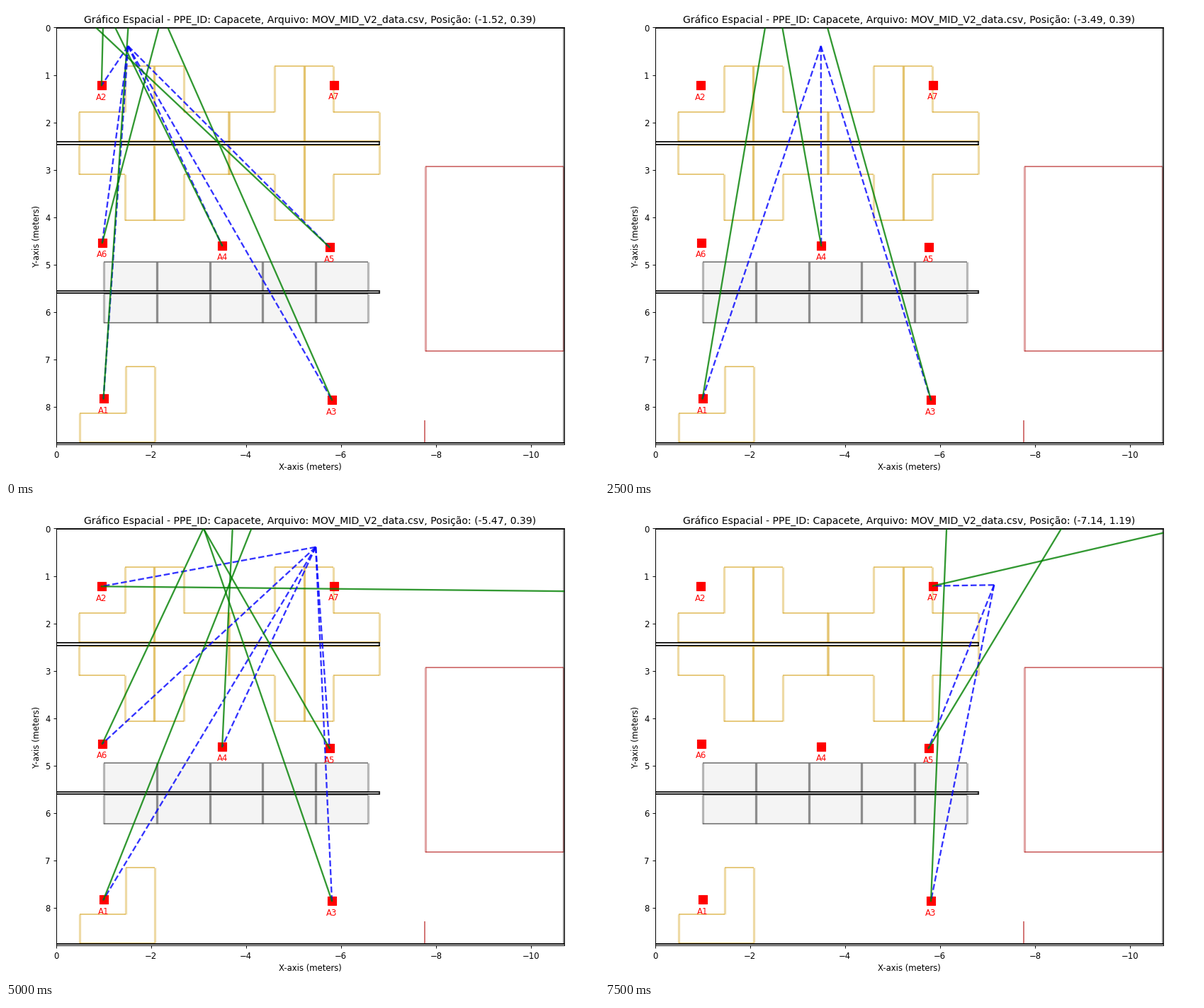
These frames come from a looping animation (837 by 669 pixels, 8 s). A matplotlib script:

```python
import numpy as np
import matplotlib.pyplot as plt
from matplotlib.animation import FuncAnimation
from matplotlib.lines import Line2D
from matplotlib.patches import Rectangle
from matplotlib.transforms import Affine2D

W, H, DPI = 837, 669, 83.7
LEFT, RIGHT, TOP, BOTTOM = 70.5, 787.9, 30.5, 620.5
FRAMES, STEP_MS = 16, 500
TITLE = ("Gráfico Espacial - PPE_ID: Capacete, Arquivo: MOV_MID_V2_data.csv, "
         "Posição: ({:.2f}, {:.2f})")

GOLD, GRAY, RED = (0.84, 0.64, 0.12), (0.35, 0.35, 0.35), (0.72, 0.15, 0.15)

ANCHORS = {
    "A1": (-1.00, 7.83), "A2": (-0.96, 1.22), "A3": (-5.81, 7.855),
    "A4": (-3.50, 4.60), "A5": (-5.76, 4.635), "A6": (-0.975, 4.54),
    "A7": (-5.855, 1.21),
}

# Measured bearing in degrees clockwise from up: (steps, angles)
BEARINGS = {
    "A1": ([0, 2, 4, 7, 10], [3.8, 6.1, 4.85, 19.0, 21.7]),
    "A2": ([0, 7, 10, 12], [1.4, 75.3, 90.6, 92.4]),
    "A3": ([0, 2, 4, 7, 10, 12, 15],
           [-23.75, -21.9, -16.6, -13.3, -18.95, -7.55, 2.4]),
    "A4": ([0, 2, 4, 7, 10, 12], [-26.1, -22.6, -13.5, -3.25, 2.7, 7.4]),
    "A5": ([0, 2, 4, 10, 15], [-46.7, -39.2, -48.2, -29.8, 31.1]),
    "A6": ([0, 4, 10], [14.7, 20.5, 25.1]),
    "A7": ([4, 15], [-64.3, 77.0]),
}

# Anchors that hear the tag at each step
HEARD = ["123456", "13456", "1345", "1345", "134567", "134", "1234", "1234",
         "1234", "12346", "123456", "234", "234", "345", "357", "357"]

fig = plt.figure(figsize=((W + 1e-6) / DPI, (H + 1e-6) / DPI), dpi=DPI)
ax = fig.add_axes([LEFT / W, 1 - BOTTOM / H, (RIGHT - LEFT) / W, (BOTTOM - TOP) / H])
stage = Affine2D().scale(1, -1).translate(0, H)


def pt(px):
    return px * 72 / DPI


def stroke(xs, ys, color, width, alpha=1.0):
    ax.add_line(Line2D(xs, ys, color=color, lw=pt(width), alpha=alpha,
                       transform=stage, zorder=0.5, solid_capstyle="butt"))


def outline(points, color, across=(1.9, 0.6), upright=(3.2, 0.4)):
    """Closed right-angled path, level and upright edges styled apart."""
    for (xa, ya), (xb, yb) in zip(points, points[1:] + points[:1]):
        width, alpha = across if ya == yb else upright
        stroke([xa, xb], [ya, yb], color, width, alpha)


def box(x0, y0, x1, y1):
    return [(x0, y0), (x1, y0), (x1, y1), (x0, y1)]


def desk(x, y, sx, sy):
    """L-shaped desk whose inner corner sits at x, y."""
    legs = [(0, 0), (0, 106.4), (41.5, 106.4), (41.5, 41), (106.2, 41), (106.2, 0)]
    outline([(x + sx * dx, y + sy * dy) for dx, dy in legs], GOLD)


def wall(top, bottom):
    stroke([71, 527.5], [top, top], "black", 1.7)
    stroke([71, 527.5], [bottom, bottom], "black", 1.7)
    stroke([526.8, 526.8], [top, bottom], "black", 2.2, 0.7)


def draw_plan():
    for x in (209, 420.5):
        for sx in (-1, 1):
            desk(x, 191, sx, -1)
            desk(x, 197, sx, 1)
    desk(210.3, 616.5, -1, -1)

    for i in range(5):
        x0 = 138.4 + 74.6 * i
        for y0, y1 in ((362, 403), (407, 448)):
            ax.add_patch(Rectangle((x0, y0), 74.6, y1 - y0, fc="#f4f4f4", ec="none",
                                   transform=stage, zorder=0.4))
            outline(box(x0, y0, x0 + 74.6, y1), GRAY, (1.8, 0.75), (3.2, 0.42))

    wall(192.2, 195.6)
    wall(402.9, 406.1)

    outline(box(592, 226.5, 787, 487.5), RED, (1.8, 0.65), (3.2, 0.42))
    stroke([591, 591], [586, 617], RED, 1.9, 0.65)

    stroke([71, 788], [31, 31], "black", 1.7)
    stroke([71, 788], [618, 618], "black", 1.8)
    stroke([71.2, 71.2], [31, 618], "black", 1.5)
    stroke([786.6, 786.6], [31, 618], "black", 2.6, 0.5)


def tag_position(step):
    x = np.interp(step, [0, 11, 12, 15], [-1.519, -5.864, -6.28, -7.14])
    y = np.interp(step, [0, 11, 12, 15], [0.39, 0.39, 0.52, 1.19])
    return x, y


draw_plan()
ax.set_xlim(0, -10.7)
ax.set_ylim(8.8, 0)
ax.set_xticks(range(0, -11, -2))
ax.set_yticks(range(9))
ax.set_xlabel("X-axis (meters)")
ax.set_ylabel("Y-axis (meters)")
title = ax.set_title("", fontsize=12)

links = {}
for name, (x, y) in ANCHORS.items():
    ax.scatter(x, y, s=100, marker="s", color="red", zorder=1)
    ax.annotate(name, (x, y), xytext=(0, -pt(20.5)), textcoords="offset points",
                ha="center", va="baseline", color="red", fontsize=10)
    links[name] = (ax.plot([], [], "b--", lw=2, alpha=0.8)[0],
                   ax.plot([], [], color="green", lw=2, alpha=0.8)[0])


def update(step):
    tx, ty = tag_position(step)
    title.set_text(TITLE.format(tx, ty))
    for name, (true_line, ray) in links.items():
        heard = name[1] in HEARD[step]
        true_line.set_visible(heard)
        ray.set_visible(heard)
        if heard:
            x, y = ANCHORS[name]
            angle = np.radians(np.interp(step, *BEARINGS[name]))
            true_line.set_data([tx, x], [ty, y])
            ray.set_data([x, x - 15 * np.sin(angle)], [y, y - 15 * np.cos(angle)])
    return [title, *(line for pair in links.values() for line in pair)]


anim = FuncAnimation(fig, update, frames=FRAMES, interval=STEP_MS,
                     repeat=True, repeat_delay=0, blit=False)
plt.show()
```
